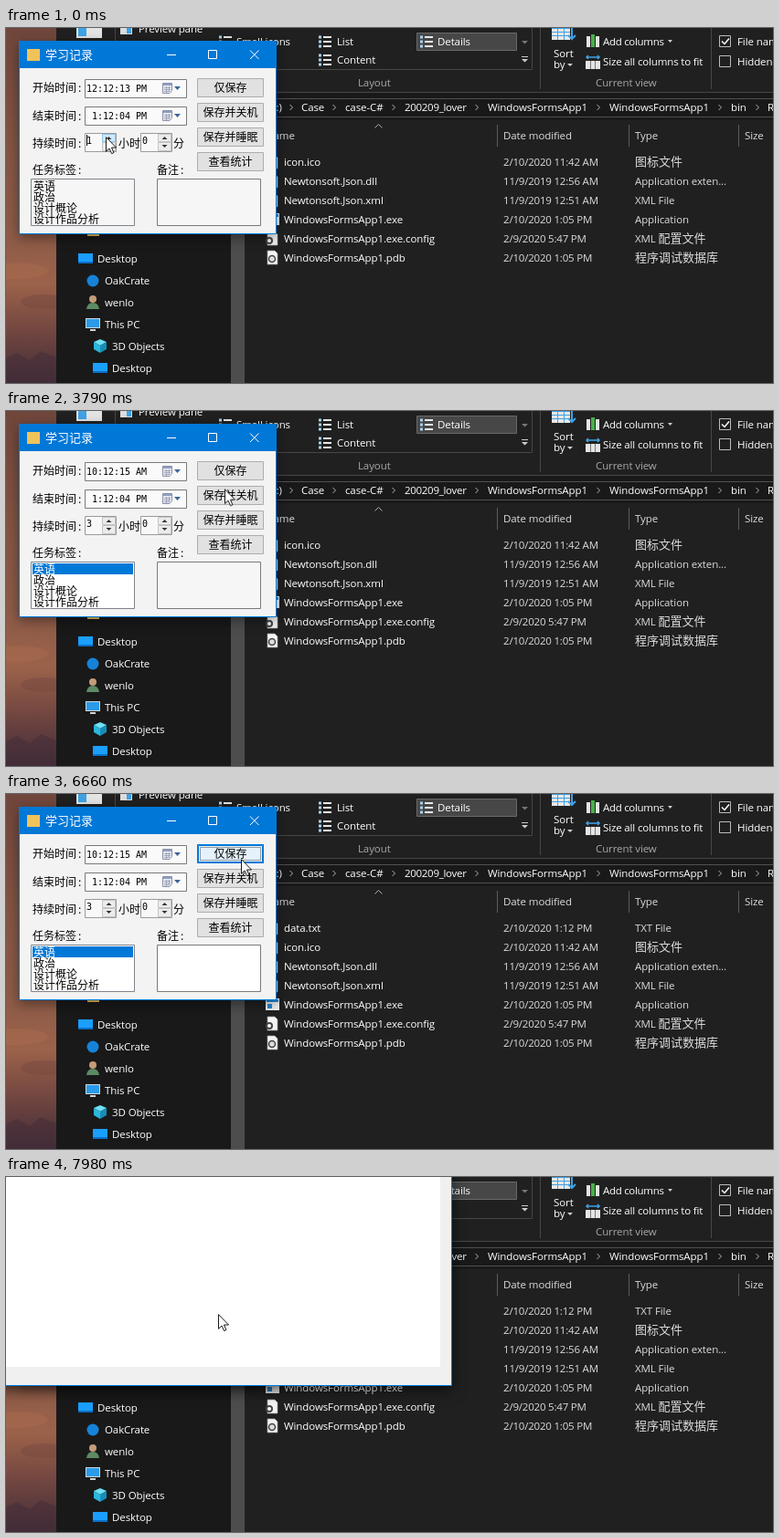
Animation of 839x389 px, one loop 8 s. Source, as an HTML page:

```html
<!DOCTYPE html>
<html lang="zh-CN">
<head>
<meta charset="utf-8">
<title>学习记录</title>
<style>
html, body { margin: 0; width: 100%; height: 100%; overflow: hidden; background: #202020; }
svg { display: block; width: 839px; height: 389px; }
text { font: 11.5px "Open Sans", "Noto Sans CJK SC", sans-serif; letter-spacing: -.1px; fill: #fff; white-space: pre; }
.dim { fill: #dcdcdc; }
.date { fill: #dcdcdc; letter-spacing: -.2px; }
.tight { letter-spacing: -.3px; }
.group { fill: #a8a8a8; }
.cjk { font-size: 13px; letter-spacing: 0; }
.form text { font: 12px "Noto Sans CJK SC", sans-serif; letter-spacing: 0; fill: #000; }
.form .title { font-size: 13px; fill: #fff; }
.form .mono { font: 10px "DejaVu Sans Mono", monospace; letter-spacing: -.02px; }
.form .white { fill: #fff; }
.form { filter: drop-shadow(0 4px 7px #0006); }
.chev { fill: none; stroke: #b0b0b0; }

.cursor { animation: move 8s linear infinite; }
@keyframes move {
  0%, .75% { transform: translate(109px, 119px); }
  1.125%, 24.875% { transform: translate(111px, 119px); }
  31.5%, 36.125% { transform: translate(60px, 176px); }
  45.875%, 47% { transform: translate(240px, 71px); }
  47.375% { transform: translate(239px, 85px); }
  53.125%, 63.375% { transform: translate(225px, 171px); }
  64.75%, 83.5% { transform: translate(257px, 71px); }
  90.5%, 97.5% { transform: translate(242px, 148px); }
  99.7%, 100% { transform: translate(232px, 150px); }
}
.files { animation: shift 8s step-end infinite; }
@keyframes shift {
  0% { transform: translateY(0); }
  83.25%, 100% { transform: translateY(21px); }
}
.focus { animation: focus 8s linear infinite; }
@keyframes focus {
  0%, 56.7% { opacity: 0; }
  56.75%, 73.625% { opacity: 1; }
  76.625%, 100% { opacity: 0; }
}
.stats {
  transform-origin: 222px 95px;
  filter: drop-shadow(0 5px 8px #0008);
  animation: open 8s linear infinite;
}
@keyframes open {
  0%, 95.6% { opacity: 0; transform: scale(.94); }
  96.75% { opacity: .48; transform: scale(.97); }
  98.6% { opacity: .95; transform: scale(.995); }
  99.7%, 100% { opacity: 1; transform: none; }
}
</style>
</head>
<body>
<svg viewBox="0 0 839 389">
  <defs>
    <linearGradient id="sky" x2="0" y2="1">
      <stop offset="0" stop-color="#70463c"/>
      <stop offset=".35" stop-color="#855644"/>
      <stop offset=".6" stop-color="#8f5c48"/>
      <stop offset=".72" stop-color="#9c624a"/>
      <stop offset=".86" stop-color="#704540"/>
      <stop offset="1" stop-color="#432d38"/>
    </linearGradient>
    <g id="screen">
      <path fill="#1a9fff" d="M0 1h16v11H0z"/>
      <path fill="#0a6fc8" d="M0 10h16v2H0z"/>
    </g>
    <g id="list" fill="none">
      <path stroke="#e8e8e8" stroke-width="2" d="M6 2h9M6 7h9M6 12h9"/>
      <path stroke="#a9d3f2" stroke-width="3" d="M1 2h3M1 7h3M1 12h3"/>
    </g>
    <path id="page" fill="#f4f4f4" stroke="#999" stroke-width=".7" d="M2 0h8l3 3v12H2z"/>
    <g id="calendar">
      <path fill="#e6e9f2" stroke="#8a90a8" d="M.5 -.5h10v8l-2.500 3h-7.500z"/>
      <path fill="#8f9fc0" d="M1 0h9v2H1z"/>
      <path stroke="#a4a8ba" d="M2 4.500h7M2 6.500h7M2 8.500h5M4.500 3v7M7.500 3v6"/>
      <path fill="#3f6496" d="M13 3h7l-3.500 4z"/>
    </g>
    <g id="spin">
      <path fill="#f8f8f8" stroke="#9a9a9a" d="M.5 .5h34v20H.5z"/>
      <path fill="#ececec" stroke="#c4c4c4" d="M19.5 1.5h14v8h-14zM19.5 10.5h14v9h-14z"/>
    </g>
    <path id="arrows" fill="#333" d="M23.500 7h6l-3-3zM23.500 13h6l-3 3z"/>
  </defs>

  <!-- wallpaper -->
  <path fill="url(#sky)" d="M0 0h56v389H0z"/>
  <g>
    <ellipse cx="12" cy="266" rx="34" ry="9" fill="#b0714f" opacity=".35"/>
    <ellipse cx="42" cy="300" rx="26" ry="8" fill="#70453f" opacity=".4"/>
    <path fill="#432d38" d="M0 362l12-6 14 8 12-10 17 7v28H0z" opacity=".5"/>
  </g>

  <!-- file manager -->
  <path fill="#202020" d="M55 0h784v389H55z"/>
  <path fill="#191919" d="M55 70h784v31H55zM55 101h191v288H55z"/>
  <path fill="#4d4d4d" d="M246 101h15v288h-15z"/>
  <path fill="none" stroke="#474747" d="M55 70.5h784M119.5 0v67M584.5 0v67M771.5 0v67M575.5 0v45M226 45.5h349.5"/>
  <path fill="none" stroke="#505050" d="M62 77.5h777M62 97.5h777"/>
  <path fill="#e4e4e4" d="M77 0h28v11H77z"/><path fill="#3fa2e6" d="M79 0h9v9h-9z"/>
  <path fill="#ddd" d="M125 0h13v7h-13z"/><path fill="#3fa2e6" d="M132 0h5v6h-5z"/>
  <text x="145" y="5">Preview pane</text>
  <use href="#list" x="232" y="8"/><text x="252" y="19">Small icons</text>
  <use href="#list" x="341" y="8"/><text x="362" y="19">List</text>
  <use href="#list" x="341" y="28"/><text x="362" y="39">Content</text>
  <path fill="#474747" stroke="#696969" d="M449.5 5.5h109v19h-109z"/>
  <use href="#list" x="452" y="8"/><text x="472" y="19">Details</text>
  <path fill="#777" d="M564 14h7l-3.500 3.500z"/>
  <path fill="#ccc" d="M564 31h7v1h-7zM564 34h7l-3.500 3.500z"/>
  <text class="group" x="385" y="64">Layout</text>
  <path fill="#e8e8e8" d="M597 0h20v13h-20z"/>
  <path stroke="#3fa2e6" d="M597 .5h20M597 4.500h20M597 8.500h20M603.500 0v13M610.500 0v13"/>
  <path stroke="#3fa2e6" stroke-width="2" fill="none" d="M619 0v12M615 8l4 4 4-4"/>
  <text x="599" y="32">Sort</text><text x="599" y="44">by</text>
  <path fill="#ccc" d="M614 39h6l-3 3zM724 13h5l-2.500 3z"/>
  <path fill="#e4e4e4" d="M635 9h4v12h-4zM645 9h4v12h-4z"/>
  <path fill="#48b04a" d="M640 7h4v14h-4z"/>
  <text class="tight" x="653" y="19">Add columns</text>
  <path fill="#e4e4e4" d="M634 36h16v9h-16z"/>
  <path stroke="#777" d="M639.5 36v9M644.5 36v9"/>
  <path stroke="#3fa2e6" stroke-width="1.500" fill="none" d="M635 32h14M637 30l-2 2 2 2M647 30l2 2-2 2"/>
  <text x="653" y="41" style="letter-spacing:-.15px">Size all columns to fit</text>
  <text class="group" x="645" y="64">Current view</text>
  <path fill="none" stroke="#bbb" d="M780.5 8.500h12v12h-12zM780.5 30.500h12v12h-12z"/>
  <path fill="none" stroke="#fff" stroke-width="1.500" d="M783 14.500l3 3 5-6"/>
  <text x="800" y="19">File name extensions</text>
  <text x="800" y="41">Hidden items</text>

  <text x="284" y="91">(D:)</text>
  <text y="91"><tspan x="323">Case</tspan><tspan x="371">case-C#</tspan><tspan class="tight" x="436">200209_lover</tspan><tspan x="527">WindowsFormsApp1</tspan><tspan x="660">WindowsFormsApp1</tspan><tspan x="793">bin</tspan><tspan x="833">Release</tspan></text>
  <g id="crumbs" class="chev"></g>

  <path stroke="#5c5c5c" d="M537.5 106v24M681.5 106v24M801.5 106v24"/>
  <path class="chev" d="M403.500 109.500l4-4 4 4"/>
  <text class="dim" y="122"><tspan x="284">Name</tspan><tspan x="544">Date modified</tspan><tspan x="688">Type</tspan><tspan x="808">Size</tspan></text>
  <g data-on="6660-8000">
    <use href="#page" x="284" y="139"/>
    <text x="304" y="151">data.txt</text>
    <text class="date" x="544" y="151">2/10/2020 1:12 PM</text>
    <text class="dim" x="688" y="151">TXT File</text>
  </g>
  <g id="files" class="files"></g>

  <!-- folder tree -->
  <path fill="#e9bd55" d="M89 214h13v14H89z"/>
  <text x="108" y="223">WindowsFormsApp1</text>
  <use href="#screen" x="79" y="246"/><text x="100" y="257">Desktop</text>
  <circle cx="95" cy="277" r="6.500" fill="#1683d8"/><text x="108" y="281">OakCrate</text>
  <circle cx="95" cy="297" r="4" fill="#c59b78"/><path fill="#5d8a63" d="M88 308q1-7 7-7t7 7z"/>
  <text x="108" y="305">wenlo</text>
  <path fill="#cfd6dc" d="M87 318h16v11H87z"/><path fill="#2a9be8" d="M88 319h14v9H88z"/><path fill="#cfd6dc" d="M92 330h6v2h-6z"/>
  <text x="108" y="329">This PC</text>
  <path fill="#6fe0f5" d="M103 341l7 3-7 4-7-4z"/><path fill="#2cb7dc" d="M96 344l7 4v8l-7-4z"/><path fill="#168fb8" d="M110 344l-7 4v8l7-4z"/>
  <text x="116" y="353">3D Objects</text>
  <use href="#screen" x="95" y="366"/><text x="116" y="377">Desktop</text>

  <!-- study log form -->
  <g class="form">
    <path fill="#f3f3f3" stroke="#0078d7" d="M14.500 14.500h281v211h-281z"/>
    <path fill="#0078d7" d="M14 14h282v30H14z"/>
    <text class="title" x="43" y="34">学习记录</text>
    <path fill="none" stroke="#fff" d="M176 29.500h10M221.500 24.500h9v9h-9zM267 24.500l9.500 9.500M276.500 24.500L267 34"/>
    <g data-on="7650-8000">
      <path fill="#fff" d="M15 15h280v29H15z"/>
      <text class="title" style="fill:#888" x="43" y="34">学习记录</text>
      <path fill="none" stroke="#888" d="M176 29.500h10M221.500 24.500h9v9h-9zM267 24.500l9.500 9.500M276.500 24.500L267 34"/>
    </g>
    <path fill="#f0c35a" d="M23 23h14v13H23z"/>

    <g id="labels"></g>
    <path fill="#fafafa" stroke="#7a7a7a" d="M86.500 56.500h111v20h-111zM86.500 86.500h111v20h-111z"/>
    <use href="#calendar" x="171" y="61"/><use href="#calendar" x="171" y="91"/>
    <text class="mono" x="88" y="70" data-on="0-360">12:12:13 PM</text>
    <text class="mono" x="88" y="70" data-on="360-1440">11:12:14 AM</text>
    <text class="mono" x="88" y="70" data-on="1440-8000">10:12:15 AM</text>
    <text class="mono" x="94" y="100">1:12:04 PM</text>

    <use href="#spin" x="86" y="115"/><use href="#spin" x="147" y="115"/>
    <path fill="#d3e9fa" stroke="#8cc3ee" d="M105.500 116.500h14v8h-14z" data-on="0-2040"/>
    <path fill="#9fd0f5" stroke="#4a9bd8" d="M105.500 116.500h14v8h-14z" data-on="360-450 1440-1530"/>
    <use href="#arrows" x="86" y="115"/><use href="#arrows" x="147" y="115"/>
    <text class="mono" x="88" y="127" data-on="0-360">1</text>
    <text class="mono" x="88" y="127" data-on="360-1440">2</text>
    <text class="mono" x="88" y="127" data-on="1440-8000">3</text>
    <text class="mono" x="149" y="127">0</text>
    <path fill="#000" d="M88 117h1v12h-1z" data-on="0-980 1440-1990"/>
    <text x="123" y="131">小时</text><text x="183" y="131">分</text>

    <path fill="#f6f6f6" stroke="#7f838a" d="M27.500 165.500h113v51h-113z"/>
    <path fill="#fff" d="M28 166h112v50H28z" data-on="2560-8000"/>
    <path fill="#0078d7" d="M29 167h110v12H29z" data-on="2560-8000"/>
    <g id="tags"></g>
    <text class="white" x="30" y="178" data-on="2560-8000">英语</text>

    <path fill="#f6f6f6" stroke="#7a7a7a" d="M165.500 165.500h113v51h-113z"/>
    <path fill="#fff" d="M166 166h112v50H166z" data-on="4540-8000"/>
    <path class="focus" fill="none" stroke="#0078d7" d="M165.500 165.500h113v51h-113z"/>
    <path fill="#000" d="M168 168h1v12h-1z" data-on="4540-5070 5590-5890"/>
    <g id="buttons"></g>
  </g>

  <!-- statistics window -->
  <g class="stats">
    <path fill="#f0f0f0" stroke="#0078d7" d="M-44 -38H487.500V228.500H-44z"/>
    <path fill="#fff" d="M-31 -9H475V208H-31z"/>
  </g>

  <g class="cursor">
    <path fill="#fff" stroke="#000" stroke-width=".9" d="M.5 .7V16.300L4 13l2.600 5.600 2.300-1L6.500 12h5z" data-on="0-4220 5095-8000"/>
    <path fill="none" stroke="#000" d="M-3 -7.500h3q.500 0 .500 1v13q0 1-.500 1h-3M4 -7.500H1M4 7.500H1" data-on="4220-5095"/>
  </g>
</svg>
<script>
const LOOP = 8000;
const fill = (id, items, draw) => {
  document.getElementById(id).innerHTML = items.map(draw).join('');
};

fill('crumbs', [312, 359, 424, 515, 648, 781, 822], x => `<path d="M${x - 1.5} 84l3 3-3 3"/>`);

const cjk = s => s.replace(/[\u4e00-\u9fff]+/g, '<tspan class="cjk">$&</tspan>');
const marks = {
  exe: '<path fill="#eee" d="M0 1h15v13H0z"/><path fill="#2a86d1" d="M1 2h13v3H1zM2 7h5v5H2z"/>',
  config: '<use href="#page"/><circle cx="4" cy="10" r="3" fill="#fff" stroke="#444" stroke-width="2"/>',
  pdb: '<use href="#page"/><circle cx="7" cy="9" r="3.500" fill="#ddd" stroke="#444" stroke-width="1.500"/>',
};
fill('files', [
  ['icon.ico', '2/10/2020 11:42 AM', '图标文件'],
  ['Newtonsoft.Json.dll', '11/9/2019 12:56 AM', 'Application exten...'],
  ['Newtonsoft.Json.xml', '11/9/2019 12:51 AM', 'XML File'],
  ['WindowsFormsApp1.exe', '2/10/2020 1:05 PM', 'Application'],
  ['WindowsFormsApp1.exe.config', '2/9/2020 5:47 PM', 'XML 配置文件'],
  ['WindowsFormsApp1.pdb', '2/10/2020 1:05 PM', '程序调试数据库'],
], ([name, date, type], i) => {
  const y = 151 + 21 * i;
  const mark = marks[name.split('.').pop()] || '<use href="#page"/>';
  return `<g transform="translate(284 ${y - 12})">${mark}</g>
    <text x="304" y="${y}">${name}</text>
    <text class="date" x="544" y="${y}">${date}</text>
    <text class="dim" x="688" y="${y}">${cjk(type)}</text>`;
});

fill('labels', [
  ['开始时间', 29, 70], ['结束时间', 29, 101], ['持续时间', 29, 131],
  ['任务标签', 29, 160], ['备注', 165, 160],
], ([s, x, y]) => `<text x="${x}" y="${y}">${s}<tspan dx="2">:</tspan></text>`);

fill('tags', ['英语', '政治', '设计概论', '设计作品分析'],
  (s, i) => `<text x="30" y="${178 + 12 * i}"${i ? '' : ' data-on="0-2560"'}>${s}</text>`);

// label, then the times of hover, focus and press
fill('buttons', [
  ['仅保存', '3560-3770 5130-6734', '5950-7450', '5890-5950'],
  ['保存并关机', '3810-3886 6775-6919'],
  ['保存并睡眠', '3918-4030 6960-7103'],
  ['查看统计', '4063-4175 7144-8000', '7500-8000', '7450-7500'],
], ([label, hover, focus, press], i) => {
  const y = 55 + 27 * i;
  const box = (inset, paint, on) => `<path ${paint} d="M${209.5 + inset} ${y + .5 + inset}h${72 - 2 * inset}v${20 - 2 * inset}h${2 * inset - 72}z"${on ? ` data-on="${on}"` : ''}/>`;
  const ring = 'fill="none" stroke="#0078d7"';
  return box(0, 'fill="#e1e1e1" stroke="#adadad"')
    + box(0, 'fill="#e5f1fb" stroke="#0078d7"', hover)
    + (focus ? box(0, ring, focus) + box(1, ring, focus)
      + box(3, 'fill="none" stroke="#444" stroke-dasharray="1"', focus) : '')
    + (press ? box(0, 'fill="#cce4f7" stroke="#005499"', press) : '')
    + `<text x="245.500" y="${y + 15}" text-anchor="middle">${label}</text>`;
});

// turn each data-on list of "from-to" times into stepped keyframes
const sheet = document.createElement('style');
document.querySelectorAll('[data-on]').forEach((el, i) => {
  const at = (ms, v) => `${ms / LOOP * 100}%{opacity:${v}}`;
  const steps = el.dataset.on.split(' ').map(r => {
    const [from, to] = r.split('-');
    return at(from, 1) + at(to, 0);
  });
  sheet.textContent += `@keyframes on${i}{${at(0, 0)}${steps.join('')}}`;
  el.style.animation = `on${i} ${LOOP}ms step-end infinite`;
});
document.head.append(sheet);
</script>
</body>
</html>
```
